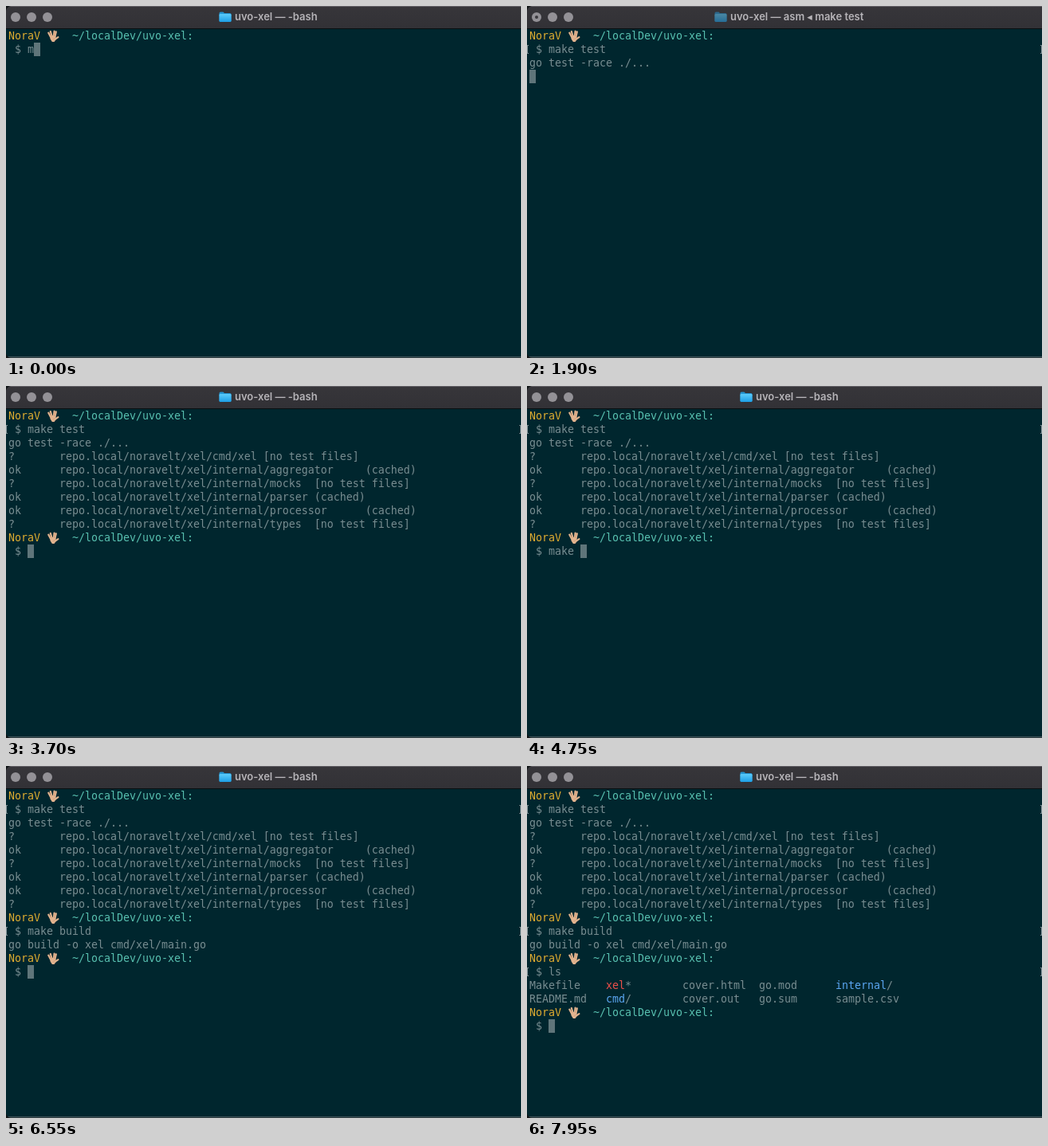
Animation, 646 px wide and 442 px high, one loop 8000 ms. Source, as an HTML page:

```html
<!DOCTYPE html>
<html lang="en">
<head>
<meta charset="utf-8">
<title>Terminal</title>
<style>
  html, body { margin: 0; width: 100%; height: 100%; overflow: hidden; background: #00262e; }
  svg { display: block; }
  text { white-space: pre; }
  #screen { font: 13.29px "DejaVu Sans Mono", "Noto Sans Mono", monospace; fill: #788d91; }
  #title { font: 600 13px Inter, "DejaVu Sans", sans-serif; fill: #b6b4b8; }
  .user { fill: #e0ac30; }
  .path { fill: #58c0b0; }
  .exec { fill: #ee4f4a; }
  .dir { fill: #5ba6f2; }
  .mark { fill: none; stroke: #8b9da1; }
</style>
</head>
<body>
<svg width="646" height="442" viewBox="0 0 646 442">
  <defs>
    <linearGradient id="bar" x2="0" y2="1">
      <stop stop-color="#37363a"/><stop offset="1" stop-color="#323136"/>
    </linearGradient>
    <linearGradient id="blue" x2="0" y2="1">
      <stop stop-color="#5ccbfa"/><stop offset="1" stop-color="#1d9fe6"/>
    </linearGradient>
    <g id="hand" fill="none" stroke="#e3b48f" stroke-linecap="round">
      <path d="M4.8 9.5 2.2 4.6M6.6 9 4.8 3M8.8 9 9.6 2.6M10.4 9.5 11.8 3.4" stroke-width="2.2"/>
      <path d="M10.8 12.6 14.4 10.2" stroke-width="2.2"/>
      <path d="M4.8 8.5h5.8l.7 4-2 2.8H7L5 12z" fill="#e3b48f" stroke-width="1.2" stroke-linejoin="round"/>
      <path d="M5.6 8.4 3.7 4.2M9.7 8.6 10.6 4.2M8.5 12.8 10.3 11" stroke="#b98664" stroke-width=".5"/>
    </g>
  </defs>
  <rect width="646" height="442" fill="#00262e"/>
  <rect width="646" height="28" fill="url(#bar)"/>
  <path d="M0 .5H646" stroke="#626066"/>
  <path d="M0 28.5H646" stroke="#0a0f12"/>
  <path d="M0 440.5H646" stroke="#3f5459"/>
  <path d="M0 441.5H646" stroke="#2a3a3e"/>
  <path d="M0 0H6Q1 1 0 6ZM0 442V436Q1 441 6 442Z" fill="#101416"/>
  <g fill="#939196">
    <circle cx="12" cy="14" r="6"/><circle cx="32" cy="14" r="6"/><circle cx="52" cy="14" r="6"/>
  </g>
  <circle id="busyDot" cx="12" cy="14" r="2" fill="#3a383d"/>
  <g id="heading">
    <g id="folder">
      <path d="M.5 9Q.5 7.5 2 7.5H5.5L7 9H14Q15.5 9 15.5 10.5V19H.5Z" fill="#2495d2"/>
      <rect x=".5" y="10" width="15" height="10" rx="1.3" fill="url(#blue)"/>
    </g>
    <text id="title" x="20" y="18.3"></text>
  </g>
  <g id="screen"><rect id="cursor" width="8" height="17" fill="#5f757a"/></g>
</svg>
<script>
const DURATION = 8000, CELL = 8, LEFT = 3, TOP = 29, LINE = 17;
const USER = "NoraV", PROJECT = "uvo-xel", MODULE = "repo.local/noravelt/xel";
const $ = id => document.getElementById(id);
const screen = $("screen"), cursor = $("cursor");
const timed = [];
const cursorSteps = [];

const rowTop = row => TOP + row * LINE;
const lastAt = (steps, t) => steps.filter(step => step.at <= t).pop();

function add(tag, attrs, at = 0) {
  const node = document.createElementNS("http://www.w3.org/2000/svg", tag);
  for (const key in attrs) node.setAttribute(key, attrs[key]);
  screen.append(node);
  timed.push({ node, at });
  return node;
}

function write(row, col, string, at, style = "") {
  const attrs = { x: LEFT + col * CELL, y: rowTop(row) + 13, class: style };
  add("text", attrs, at).textContent = string;
}

const moveCursor = (row, col, at) => cursorSteps.push({ row, col, at });

const expandTabs = line => line.split("\t").reduce(
  (out, part) => out.padEnd((Math.floor(out.length / 8) + 1) * 8) + part);

function prompt(row, at) {
  write(row, 0, USER, at, "user");
  add("use", { href: "#hand", x: LEFT + 6 * CELL, y: rowTop(row) }, at);
  write(row, 10, `~/localDev/${PROJECT}:`, at, "path");
  write(row + 1, 1, "$", at);
  moveCursor(row + 1, 3, at);
}

function type(row, command, times) {
  times.forEach((at, i) => {
    write(row, 3 + i, command[i], at);
    moveCursor(row, 4 + i, at);
  });
}

function enter(row, at) {
  const y = rowTop(row) + 3.5;
  add("path", { class: "mark", d: `M2 ${y}H.5v10H2M644 ${y}h1.5v10H644` }, at);
  moveCursor(row + 1, 0, at);
}

prompt(0, 0);
type(1, "make test", [0, 50, 150, 200, 400, 600, 750, 950, 1100]);
enter(1, 1300);
write(2, 0, "go test -race ./...", 1450);
moveCursor(3, 0, 1450);
[
  `?\t${MODULE}/cmd/xel\t[no test files]`,
  `ok\t${MODULE}/internal/aggregator\t(cached)`,
  `?\t${MODULE}/internal/mocks\t[no test files]`,
  `ok\t${MODULE}/internal/parser\t(cached)`,
  `ok\t${MODULE}/internal/processor\t(cached)`,
  `?\t${MODULE}/internal/types\t[no test files]`
].forEach((line, i) => write(3 + i, 0, expandTabs(line), 2900));

prompt(9, 2900);
type(10, "make build", [4400, 4500, 4550, 4650, 4750, 4900, 4950, 5100, 5150, 5350]);
enter(10, 5600);
write(11, 0, "go build -o xel cmd/xel/main.go", 5700);
moveCursor(12, 0, 5700);

prompt(12, 6300);
type(13, "ls", [7000, 7300]);
enter(13, 7700);
[
  ["Makefile", "xel*", "cover.html", "go.mod", "internal/"],
  ["README.md", "cmd/", "cover.out", "go.sum", "sample.csv"]
].forEach((files, i) => files.forEach((file, j) => {
  const suffix = file.match(/[*/]$/);
  const name = suffix ? file.slice(0, -1) : file;
  const style = !suffix ? "" : suffix[0] === "*" ? "exec" : "dir";
  write(14 + i, j * 12, name, 7700, style);
  if (suffix) write(14 + i, j * 12 + name.length, suffix[0], 7700);
}));
prompt(16, 7700);

const titles = [
  [0, "-bash"],
  [1600, "go ◂ make test"], [1900, "asm ◂ make test"], [2250, "go ◂ make test"],
  [2400, "cgo ◂ make test"], [2550, "vet ◂ make test"], [3250, "-bash"],
  [5750, "go ◂ make build"], [5950, "link ◂ make build"], [6550, "-bash"]
].map(([at, label]) => ({ at, label }));

function drawTitle(label) {
  const title = $("title"), string = `${PROJECT} — ${label}`;
  const busy = label !== "-bash";
  if (title.textContent !== string) title.textContent = string;
  const x = 329 - (20 + title.getComputedTextLength()) / 2;
  $("heading").setAttribute("transform", `translate(${Math.round(x)} 0)`);
  $("folder").setAttribute("opacity", busy ? .55 : 1);
  $("busyDot").setAttribute("visibility", busy ? "visible" : "hidden");
}

function draw(t) {
  for (const { node, at } of timed) node.setAttribute("visibility", t >= at ? "visible" : "hidden");
  const { row, col } = lastAt(cursorSteps, t);
  cursor.setAttribute("x", LEFT + col * CELL);
  cursor.setAttribute("y", rowTop(row));
  drawTitle(lastAt(titles, t).label);
}

const start = performance.now();
function tick() {
  draw((performance.now() - start) % DURATION);
  requestAnimationFrame(tick);
}
tick();
</script>
</body>
</html>
```
